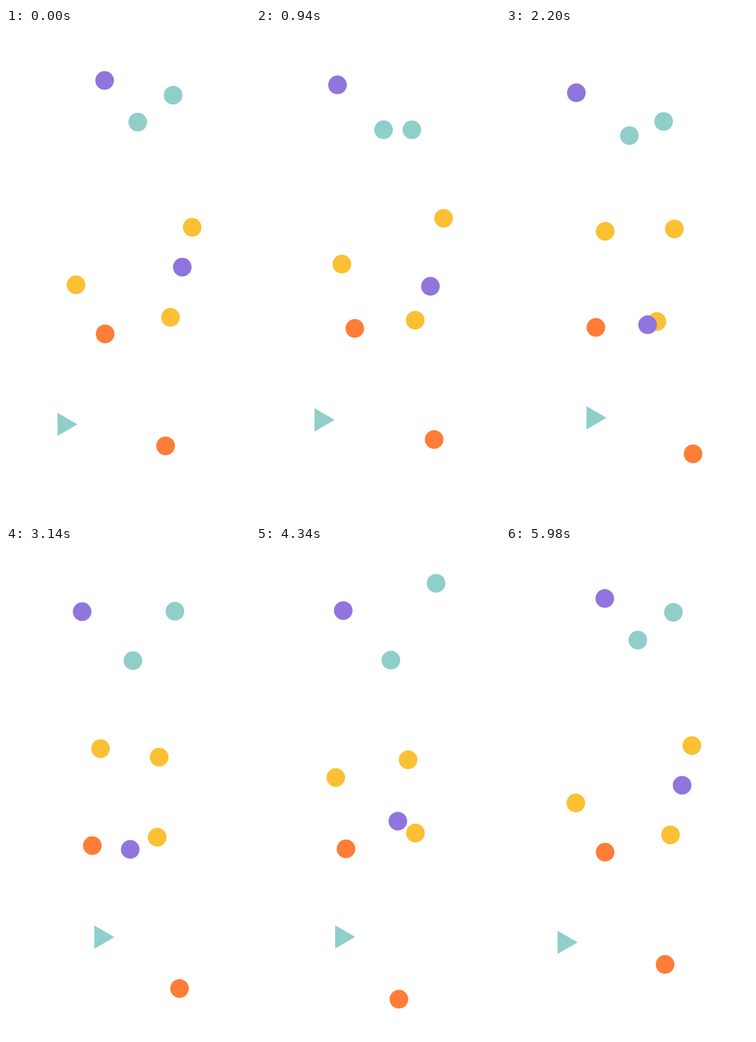
These frames come from a looping animation (500x1000 px, 6 s). An HTML page:

```html
<!DOCTYPE html>
<html lang="en">
<head>
<meta charset="utf-8">
<title>Drifting shapes</title>
<style>
  html, body { margin: 0; width: 100%; height: 100%; overflow: hidden; background: #fff; }
  svg { display: block; width: 100%; height: 100%; }
</style>
</head>
<body>
<svg id="stage" viewBox="0 0 500 1000"></svg>
<script>
const LOOP = 6000;
const times = [0, 940, 2200, 3140, 4340, 5120];
const count = times.length;
const purple = '#9175df', teal = '#90ceca', yellow = '#fbc033', orange = '#ff7d37';

// Each shape drifts through its points at the shared times.
// "pace" optionally sets the velocity at the loop seam, in px per ms.
const shapes = [
  { color: teal, triangle: true,
    x: [105.5, 120, 164.9, 181, 162.2, 133.3], y: [808.9, 799.7, 795.5, 798.2, 797.8, 802.3] },
  { color: teal,
    x: [342.4, 319.4, 323, 346.1, 369, 364.2], y: [137, 207.7, 190.8, 133.2, 76.1, 83.6] },
  { color: teal,
    x: [270, 261.4, 252.8, 260, 276.4, 278], y: [192, 207.7, 219.6, 233.9, 232.9, 216.3] },
  { color: orange, pace: [0.052, -0.052],
    x: [327, 365, 383.3, 355.6, 292.9, 286.7], y: [852.9, 839.8, 869, 903, 924.9, 902.6] },
  { color: orange, pace: [0.005, -0.022],
    x: [203.2, 202.5, 184.2, 176.9, 184.4, 194.2], y: [624.4, 613.2, 611, 611.5, 618, 623.2] },
  { color: yellow,
    x: [381.5, 384.4, 345.1, 313.9, 311.7, 338.8], y: [406.8, 388.5, 410, 431, 436.3, 425.9] },
  { color: yellow,
    x: [143.5, 175.9, 203.3, 193.8, 163.6, 141.1], y: [524.1, 482, 415, 413.5, 472.5, 511.3] },
  { color: yellow, pace: [-0.006, 0.045],
    x: [337, 326.2, 309.2, 309.8, 326.6, 334], y: [590.4, 596.3, 599.1, 594.4, 585.8, 578.4] },
  { color: purple,
    x: [202.1, 167, 144.2, 156, 178.8, 197.8], y: [107, 116.2, 132.2, 134, 131.8, 125.3] },
  { color: purple, pace: [0.018, -0.018],
    x: [361.2, 357.4, 290.2, 254.5, 290.6, 332.1], y: [488, 527.1, 605.6, 619.2, 561.6, 517.6] }
];

const next = i => (i + 1) % count;
const prev = i => (i + count - 1) % count;
const span = i => (times[i + 1] ?? LOOP) - times[i];

// Periodic cubic spline, returned as a function of time.
function spline(values, seamSlope) {
  const chord = i => (values[next(i)] - values[i]) / span(i);
  const slopes = values.map((_, i) => (chord(prev(i)) + chord(i)) / 2);
  if (seamSlope !== undefined) slopes[0] = seamSlope;

  for (let pass = 0; pass < 40; pass++) {
    for (let i = seamSlope === undefined ? 0 : 1; i < count; i++) {
      const before = prev(i);
      const w = span(i) / (span(before) + span(i));
      slopes[i] = (w * (3 * chord(before) - slopes[before])
        + (1 - w) * (3 * chord(i) - slopes[next(i)])) / 2;
    }
  }

  return t => {
    let i = count - 1;
    while (t < times[i]) i--;
    const j = next(i), h = span(i);
    const s = (t - times[i]) / h, r = 1 - s;
    return r * r * (1 + 2 * s) * values[i] + s * s * (3 - 2 * s) * values[j]
      + h * s * r * (r * slopes[i] - s * slopes[j]);
  };
}

function build({ color, triangle, x, y, pace = [] }) {
  const node = document.createElementNS('http://www.w3.org/2000/svg', triangle ? 'path' : 'circle');
  if (triangle) node.setAttribute('d', 'M0-23.7 41 0 0 23.7Z');
  else node.setAttribute('r', 19.1);
  node.setAttribute('fill', color);
  document.getElementById('stage').append(node);
  return { node, x: spline(x, pace[0]), y: spline(y, pace[1]) };
}

const movers = shapes.map(build);

function draw() {
  const t = performance.now() % LOOP;
  for (const { node, x, y } of movers) {
    node.setAttribute('transform', `translate(${x(t).toFixed(2)} ${y(t).toFixed(2)})`);
  }
  requestAnimationFrame(draw);
}
draw();
</script>
</body>
</html>
```
